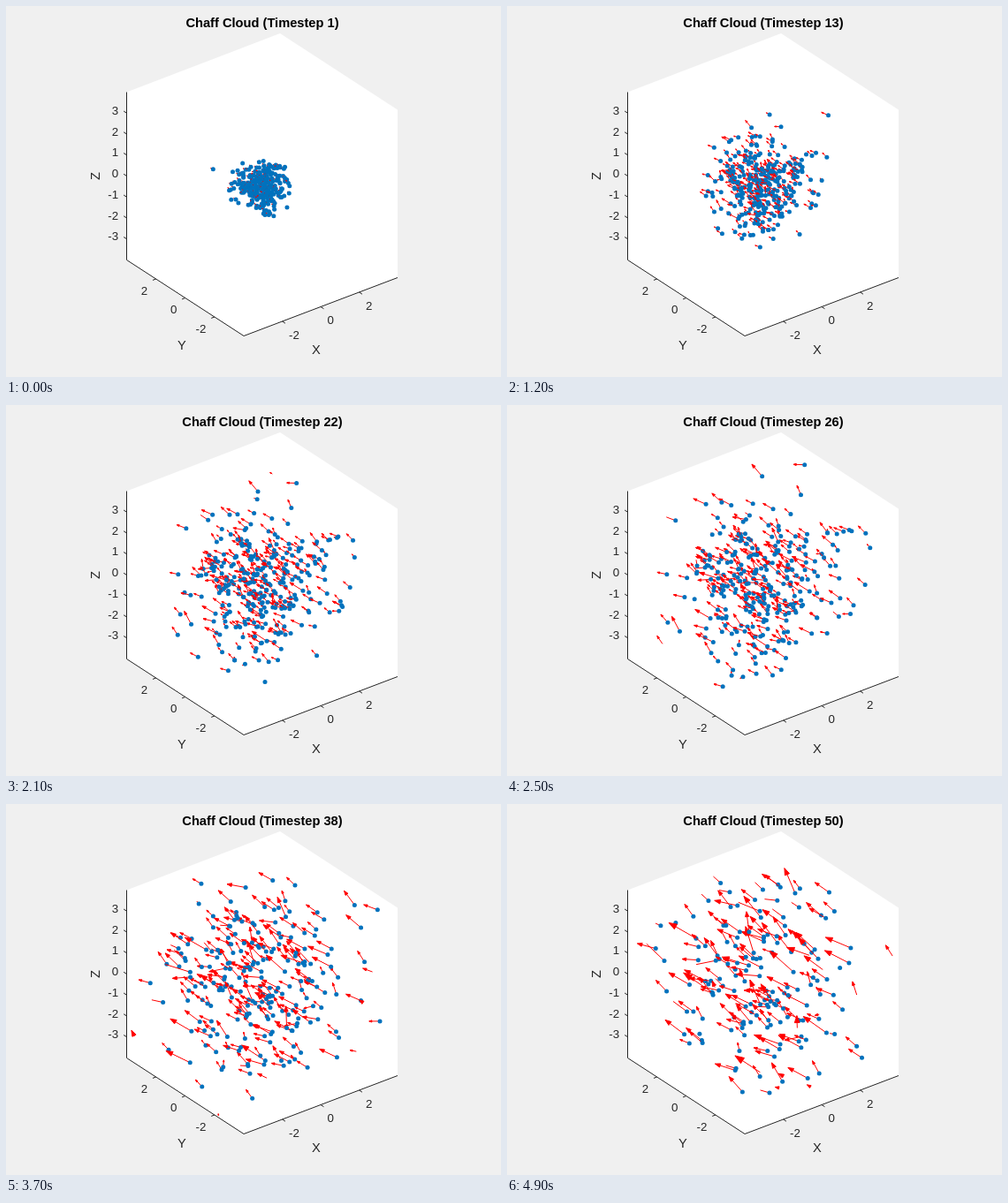
An HTML page with a canvas for the animation above (5 s loop, 560 by 420 pixels).

```html
<!DOCTYPE html>
<html lang="en">
<head>
<meta charset="utf-8">
<title>Chaff Cloud</title>
<style>
  html, body { margin: 0; width: 100%; height: 100%; overflow: hidden; background: #f0f0f0; }
  svg, canvas { position: absolute; left: 0; top: 0; width: 560px; height: 420px; }
  text { font-family: "Liberation Sans", Arial, sans-serif; font-size: 13.33px; fill: #262626; }
  .label { font-size: 14.67px; text-anchor: middle; }
  #title { font-weight: bold; fill: #000; }
</style>
</head>
<body>
<svg id="plot" viewBox="0 0 560 420">
  <path d="M136.5 97.5L310 31L443 117.5V307.5L269 373.5L136.5 287.5Z" fill="#fff"/>
  <path id="axes" fill="none" stroke="#262626"/>
  <text id="title" class="label" x="290" y="24"></text>
  <text class="label" x="351" y="394">X</text>
  <text class="label" x="199" y="389">Y</text>
  <text class="label" transform="translate(106 192.5) rotate(-90)">Z</text>
</svg>
<canvas id="cloud" width="560" height="420"></canvas>
<script>
const STEPS = 50, STEP_MS = 100, COUNT = 300, LIMIT = 4;
const plot = document.getElementById('plot');
const title = document.getElementById('title');
const ctx = document.getElementById('cloud').getContext('2d');

const project = ([x, y, z]) => [
  289.8 + 21.75 * x - 16.56 * y,
  202.5 - 8.25 * x - 10.75 * y - 23.75 * z
];

function drawAxes() {
  let d = 'M136.5 97.5V287.5L269 373.5L443 307.5';
  const tick = (point, dx, dy, value, lx, ly, anchor) => {
    const [x, y] = project(point);
    d += `M${x} ${y}l${dx} ${dy}`;
    const text = document.createElementNS(plot.namespaceURI, 'text');
    text.setAttribute('x', x + lx);
    text.setAttribute('y', y + ly);
    text.setAttribute('text-anchor', anchor);
    text.textContent = value;
    plot.append(text);
  };
  for (const v of [-2, 0, 2]) {
    tick([v, -4, -4], 3.4, 2.2, v, 7.5, 19.5, 'start');
    tick([-4, v, -4], -3.7, 1.4, v, -9.5, 17.5, 'end');
  }
  for (let v = -3; v <= 3; v++) tick([-4, 4, v], -3.4, -2.2, v, -9.5, 1.5, 'end');
  document.getElementById('axes').setAttribute('d', d);
}

// Seeded generator keeps every loop identical.
let seed = 4217;
function random() {
  seed = (seed + 0x6D2B79F5) | 0;
  let n = Math.imul(seed ^ (seed >>> 15), 1 | seed);
  n = (n + Math.imul(n ^ (n >>> 7), 61 | n)) ^ n;
  return ((n ^ (n >>> 14)) >>> 0) / 4294967296;
}
const normal = s => s * Math.sqrt(-2 * Math.log(1 - random())) * Math.cos(2 * Math.PI * random());
const vector = s => [normal(s), normal(s), normal(s)];
const add = (a, b, k) => a.map((v, i) => v + b[i] * k);

const particles = Array.from({ length: COUNT }, () => ({
  start: vector(0.5),
  spread: vector(0.088),
  wind: add([0, 1, 0], vector(0.24), 1)
}));

// Part of the segment a-b inside the axes box, or null.
function clip(a, b) {
  let t0 = 0, t1 = 1;
  for (let i = 0; i < 3; i++) {
    const d = b[i] - a[i];
    const u = (-LIMIT - a[i]) / d, v = (LIMIT - a[i]) / d;
    t0 = Math.max(t0, Math.min(u, v));
    t1 = Math.min(t1, Math.max(u, v));
  }
  return t0 < t1 ? [t0, t1] : null;
}

function drawArrow(tail, tip) {
  const span = clip(tail, tip);
  if (!span) return;
  const [ax, ay] = project(tail), [bx, by] = project(tip);
  const dx = bx - ax, dy = by - ay;
  ctx.beginPath();
  ctx.moveTo(ax + dx * span[0], ay + dy * span[0]);
  ctx.lineTo(ax + dx * span[1], ay + dy * span[1]);
  ctx.stroke();
  if (span[1] < 1) return;
  const hx = bx - dx * 0.25, hy = by - dy * 0.25;
  ctx.beginPath();
  ctx.moveTo(bx, by);
  ctx.lineTo(hx - dy * 0.09, hy + dx * 0.09);
  ctx.lineTo(hx + dy * 0.09, hy - dx * 0.09);
  ctx.closePath();
  ctx.fillStyle = '#f00';
  ctx.fill();
  ctx.stroke();
}

function drawDot(pos) {
  if (pos.some(v => Math.abs(v) > LIMIT)) return;
  const [x, y] = project(pos);
  ctx.beginPath();
  ctx.arc(x, y, 2.5, 0, 2 * Math.PI);
  ctx.fillStyle = '#0072bd';
  ctx.fill();
}

const depth = ([x, y, z]) => 0.53 * x + 0.69 * y - 0.5 * z;

function drawStep(step) {
  title.textContent = `Chaff Cloud (Timestep ${step + 1})`;
  ctx.clearRect(0, 0, 560, 420);
  ctx.strokeStyle = '#f00';
  ctx.lineWidth = 1;
  const growth = step ** 0.91;
  const reach = 0.1185 + 0.0185 * step;
  particles
    .map(p => ({ pos: add(p.start, p.spread, growth), wind: p.wind }))
    .sort((a, b) => depth(b.pos) - depth(a.pos))
    .forEach(({ pos, wind }) => {
      drawArrow(pos, add(pos, wind, reach));
      drawDot(pos);
    });
}

const begin = performance.now();
let shown = -1;
function tickFrame() {
  const step = Math.floor((performance.now() - begin) / STEP_MS) % STEPS;
  if (step !== shown) drawStep(shown = step);
  requestAnimationFrame(tickFrame);
}

drawAxes();
tickFrame();
</script>
</body>
</html>
```
